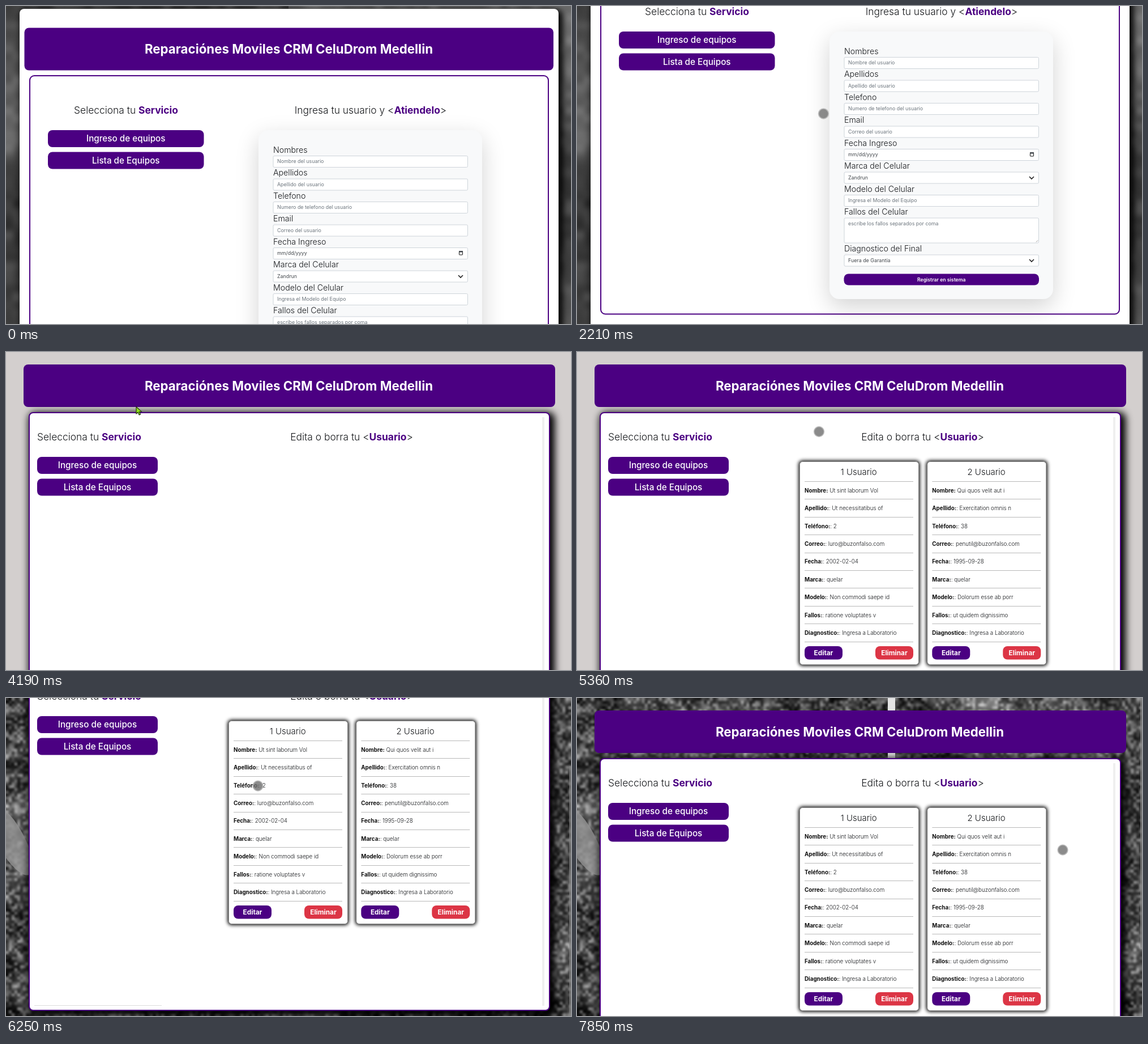
Recreate the animation shown at these times as an HTML page with a canvas. Size 998 by 561 pixels, loop 8 s.

```html
<!DOCTYPE html>
<html lang="es">
<head>
<meta charset="utf-8">
<title>Reparaciones</title>
<style>
  html, body { margin: 0; width: 100%; height: 100%; overflow: hidden; background: #d3cfce; }
  canvas { display: block; width: 100%; height: 100%; }
</style>
</head>
<body>
<canvas id="stage" width="998" height="561"></canvas>
<script>
const W = 998, H = 561, LOOP = 8000;
const INDIGO = '#4b0082', RED = '#dc3545', INK = '#15171a', MUTED = '#6c757d';
const c = document.getElementById('stage').getContext('2d');

const times = { press: 3620, release: 3760, pageB: 3900, cards: 4280, touch: 4520, photo: 5920 };

// Wheel notches: each scrolls one eased step, clamped to the page
const NOTCH = 83.3, NOTCH_MS = 180;
const wheelA = { max: 174, down: [1227, 1400, 1590], up: [] };
const wheelB = { max: 153, down: [5585, 6000], up: [7490, 7665] };

// Pointer strokes: an eased curve to (x, y), bent towards (bx, by)
const origin = { x: 888, y: 529 };
const strokes = [
  { from: 220, to: 700, bx: 690, by: 330, x: 498, y: 158 },
  { from: 1960, to: 2720, bx: 380, by: 250, x: 226, y: 112 },
  { from: 2770, to: 3570, bx: 236, by: 55, x: 229.5, y: 94 },
  { from: 4520, to: 5360, bx: 330, by: 112, x: 427.5, y: 140.5 },
  { from: 5920, to: 6250, bx: 436, by: 148, x: 445, y: 155 },
  { from: 6910, to: 7740, bx: 740, by: 225, x: 858, y: 268 }
];

function ease(t, from, ms) {
  const u = Math.min(1, Math.max(0, (t - from) / ms));
  return u * u * (3 - 2 * u);
}

function scrollAt(t, { max, down, up }) {
  const sum = list => list.reduce((s, at) => s + ease(t, at, NOTCH_MS), 0) * NOTCH;
  return Math.round(Math.max(0, Math.min(max, sum(down)) - sum(up)));
}

function pointerAt(t) {
  let p = origin;
  for (const s of strokes) {
    if (t < s.from) break;
    const u = ease(t, s.from, s.to - s.from), v = 1 - u;
    p = { x: v * v * p.x + 2 * u * v * s.bx + u * u * s.x,
          y: v * v * p.y + 2 * u * v * s.by + u * u * s.y };
  }
  return p;
}

function seeded(s) {
  return () => (s = (s * 16807) % 2147483647) / 2147483647;
}

function box(x, y, w, h, r, fill, stroke, lw = 1) {
  c.beginPath();
  c.roundRect(x, y, w, h, r);
  if (fill) { c.fillStyle = fill; c.fill(); }
  if (stroke) { c.strokeStyle = stroke; c.lineWidth = lw; c.stroke(); }
}

function shadow(x, y, w, h, r, dx, dy, blur, spread, color) {
  c.save();
  c.shadowColor = color;
  c.shadowBlur = blur;
  c.shadowOffsetX = dx + 3000;
  c.shadowOffsetY = dy;
  box(x - spread - 3000, y - spread, w + 2 * spread, h + 2 * spread, r + spread, '#000');
  c.restore();
}

function setFont(size, weight) {
  c.font = `${weight} ${size}px Inter, "Open Sans", sans-serif`;
}

// y is the middle of the capitals
function text(s, x, y, size, weight, color, align = 'left') {
  setFont(size, weight);
  c.fillStyle = color;
  c.textAlign = align;
  c.fillText(s, x, y + size * 0.36);
}

// Runs: [string, weight, color]
function runs(list, x, y, size, centred) {
  const widths = list.map(([s, w]) => (setFont(size, w), c.measureText(s).width));
  if (centred) x -= widths.reduce((a, b) => a + b) / 2;
  list.forEach(([s, w, col], i) => { text(s, x, y, size, w, col); x += widths[i]; });
}

function button(label, x, y, w, h, size, weight, fill = INDIGO) {
  box(x, y, w, h, 8, fill);
  text(label, x + w / 2, y + h / 2, size, weight, '#fff', 'center');
}

function header(x, y, w) {
  box(x, y, w, 75, 8, INDIGO);
  text('Reparaciónes Moviles CRM CeluDrom Medellin', 499.5, y + 37.5, 22.3, 700, '#fff', 'center');
}

function menu(x, y, w) {
  ['Ingreso de equipos', 'Lista de Equipos'].forEach((s, i) =>
    button(s, x, y + i * 38.5, w, 30, 15.25, 500));
}

const service = [['Selecciona tu ', 300, INK], ['Servicio', 700, INDIGO]];
const angled = (lead, word) => [[lead + ' <', 300, INK], [word, 700, INDIGO], ['>', 300, INK]];

function makeCanvas(w, h, paint) {
  const p = document.createElement('canvas');
  p.width = w;
  p.height = h;
  paint(p.getContext('2d'));
  return p;
}

// Soft random greys, one per cell, stretched over the stage
function grain(g, rnd, size, alpha) {
  const w = Math.ceil(W / size), h = Math.ceil(H / size);
  const cells = makeCanvas(w, h, q => {
    for (let i = 0; i < w * h; i++) {
      const v = 235 * rnd() ** 2;
      q.fillStyle = `rgb(${v},${v},${v})`;
      q.fillRect(i % w, Math.floor(i / w), 1, 1);
    }
  });
  g.globalAlpha = alpha;
  g.imageSmoothingQuality = 'high';
  g.drawImage(cells, 0, 0, W, H);
  g.globalAlpha = 1;
}

function stripe(g, x, tones) {
  const grad = g.createLinearGradient(0, 0, 0, H);
  tones.forEach((v, i) => grad.addColorStop(i / (tones.length - 1), `rgb(${v},${v},${v})`));
  g.fillStyle = grad;
  g.fillRect(x, 0, W / 2, H);
}

const branches = makeCanvas(W, H, g => {
  stripe(g, 0, [70, 95, 110, 40, 60, 70]);
  stripe(g, W / 2, [120, 100, 55, 60, 100]);
  grain(g, seeded(19), 14, 0.15);
});

const forest = makeCanvas(W, H, g => {
  const rnd = seeded(71);
  for (const [size, alpha] of [[60, 1], [16, 0.5], [5, 0.45]]) grain(g, rnd, size, alpha);
  g.fillStyle = 'rgba(150,150,150,.8)';
  g.beginPath();
  g.ellipse(8, 250, 24, 70, -0.5, 0, 7);
  g.fill();
  g.fillStyle = '#e4e4e4';
  g.fillRect(549, 0, 13, 110);
});

const fields = [
  ['Nombres', 'Nombre del usuario'],
  ['Apellidos', 'Apellido del usuario'],
  ['Telefono', 'Numero de telefono del usuario'],
  ['Email', 'Correo del usuario'],
  ['Fecha Ingreso', 'mm/dd/yyyy', 'date'],
  ['Marca del Celular', 'Zandrun', 'select'],
  ['Modelo del Celular', 'Ingresa el Modelo del Equipo'],
  ['Fallos del Celular', 'escribe los fallos separados por coma', 'area'],
  ['Diagnostico del Final', 'Fuera de Garantía', 'select']
];

function line(pts, color, lw) {
  c.strokeStyle = color;
  c.lineWidth = lw;
  c.beginPath();
  pts.forEach(p => c.lineTo(...p));
  c.stroke();
}

const icons = {
  select: y => line([[799, y + 19.5], [803, y + 23.5], [807, y + 19.5]], '#222', 1.6),
  date: y => {
    box(800.5, y + 18.5, 6, 5.5, 0.5, null, '#111');
    c.fillRect(800, y + 17, 7, 2.5);
  },
  area: y => line([[811, y + 54], [814, y + 51]], '#777', 0.8)
};

function field([label, value, kind], y) {
  text(label, 472, y + 0.5, 14.2, 300, INK);
  box(472, y + 11.5, 343.5, kind === 'area' ? 44 : 20, 2, '#fff', '#ced4da');
  const filled = kind === 'select' || kind === 'date';
  text(value, 479, y + 21, 8.9, 400, filled ? '#42474c' : MUTED);
  if (kind) icons[kind](y);
}

function pageA() {
  shadow(24, 5, 952, 760, 8, 4, 4, 12, 3, '#000');
  box(24, 5, 952, 760, 8, '#fff');
  header(32.5, 38.5, 934.5);
  box(42, 123, 916, 594.5, 8, '#fff', INDIGO, 2);
  runs(service, 212, 183.5, 17.4, true);
  menu(74, 219, 275.5);
  runs(angled('Ingresa tu usuario y', 'Atiendelo'), 644, 183.5, 17.4, true);
  shadow(446, 219, 395, 472, 17, 0, 13, 40, 0, 'rgba(0,0,0,.175)');
  box(446, 219, 395, 472, 17, '#f8f9fa');
  let y = 253;
  for (const f of fields) {
    field(f, y);
    y += f[2] === 'area' ? 65 : 40.5;
  }
  button('Registrar en sistema', 471.5, 646.5, 344.5, 20, 8.7, 600);
}

const rows = ['Nombre', 'Apellido', 'Teléfono', 'Correo', 'Fecha', 'Marca', 'Modelo', 'Fallos', 'Diagnostico'];
const users = [
  ['Ut sint laborum Vol', 'Ut necessitatibus of', '2', 'luro@buzonfalso.com', '2002-02-04',
   'quelar', 'Non commodi saepe id', 'ratione voluptates v', 'Ingresa a Laboratorio'],
  ['Qui quos velit aut i', 'Exercitation omnis n', '38', 'penutil@buzonfalso.com', '1995-09-28',
   'quelar', 'Dolorum esse ab porr', 'ut quidem dignissimo', 'Ingresa a Laboratorio']
];

function userCard(values, i) {
  const x = 393 + i * 225.3, y = 193, pitch = 31.4;
  shadow(x, y, 211, 359, 5, 0, 0, 6, 1.5, '#000');
  box(x + 0.5, y + 0.5, 210, 358, 5, '#fff', '#8a8a8a');
  text(`${i + 1} Usuario`, x + 104.7, y + 18.5, 15, 300, INK, 'center');
  c.fillStyle = '#b9b9b9';
  for (let k = 0; k <= rows.length; k++) c.fillRect(x + 9, Math.round(y + 35 + k * pitch), 192, 1);
  rows.forEach((r, k) => runs(
    [[r + ':', 700, '#111'], [(k ? ': ' : ' ') + values[k], 300, INK]],
    x + 9, y + 51.2 + k * pitch, 9.8, false));
  button('Editar', x + 9, y + 326, 67, 23.5, 11.8, 700);
  button('Eliminar', x + 134, y + 326, 67, 23.5, 11.8, 700, RED);
}

function pageB(withCards) {
  header(31, 22, 939);
  shadow(40, 106, 921, 599, 8, 4.2, 4.2, 12.5, 4.2, '#000');
  box(41, 107, 919, 597, 7, '#fff', INDIGO, 2);
  box(947, 115, 4, 581, 0, '#efefef');
  box(50, 695, 225, 1, 0, '#dcdcdc');
  runs(service, 55, 150, 17.4, false);
  menu(55, 185, 213);
  runs(angled('Edita o borra tu', 'Usuario'), 610.5, 150, 17.4, true);
  if (withCards) users.forEach(userCard);
}

// Overlay bar that fades once scrolling rests
function scrollbar(t, y, { max, down, up }) {
  const last = Math.max(...[...down, ...up].filter(at => at <= t));
  const alpha = 1 - ease(t, last + NOTCH_MS + 280, 120);
  if (!(alpha > 0) || last < 0) return;
  const k = H / (H + max);
  box(995, y * k, 3, H * k, 0, `rgba(128,128,128,${0.75 * alpha})`);
}

function arrow(x, y) {
  const pts = [[0, 0], [0, 12.5], [3, 9.8], [5.2, 14.5], [7.6, 13.4], [5.4, 8.9], [9.4, 8.7]];
  c.beginPath();
  pts.forEach(([a, b]) => c.lineTo(x + a, y + b));
  c.closePath();
  c.fillStyle = '#8fe01c';
  c.fill();
  c.strokeStyle = '#1c2b08';
  c.lineWidth = 1.1;
  c.stroke();
}

function cursor(t) {
  if (t < strokes[0].from) return;
  const { x, y } = pointerAt(t);
  if (t >= times.pageB && t < times.touch) return arrow(x + 0.5, y + 2.5);
  const pressed = t >= times.press && t < times.release;
  c.beginPath();
  c.arc(x, y, 8.8, 0, 7);
  c.fillStyle = pressed ? 'rgba(75,75,75,.85)' : 'rgba(110,110,110,.8)';
  c.fill();
  c.strokeStyle = 'rgba(185,185,185,.85)';
  c.lineWidth = 1.8;
  c.stroke();
}

function draw(t) {
  const first = t < times.pageB;
  const wheel = first ? wheelA : wheelB;
  const y = scrollAt(t, wheel);
  if (first) c.drawImage(branches, 0, 0);
  else if (t >= times.photo) c.drawImage(forest, 0, 0);
  else box(0, 0, W, H, 0, '#d3cfce');
  c.save();
  c.translate(0, -y);
  if (first) pageA();
  else pageB(t >= times.cards);
  c.restore();
  scrollbar(t, y, wheel);
  cursor(t);
}

const start = performance.now();
function tick() {
  draw((performance.now() - start) % LOOP);
  requestAnimationFrame(tick);
}
tick();
</script>
</body>
</html>
```
